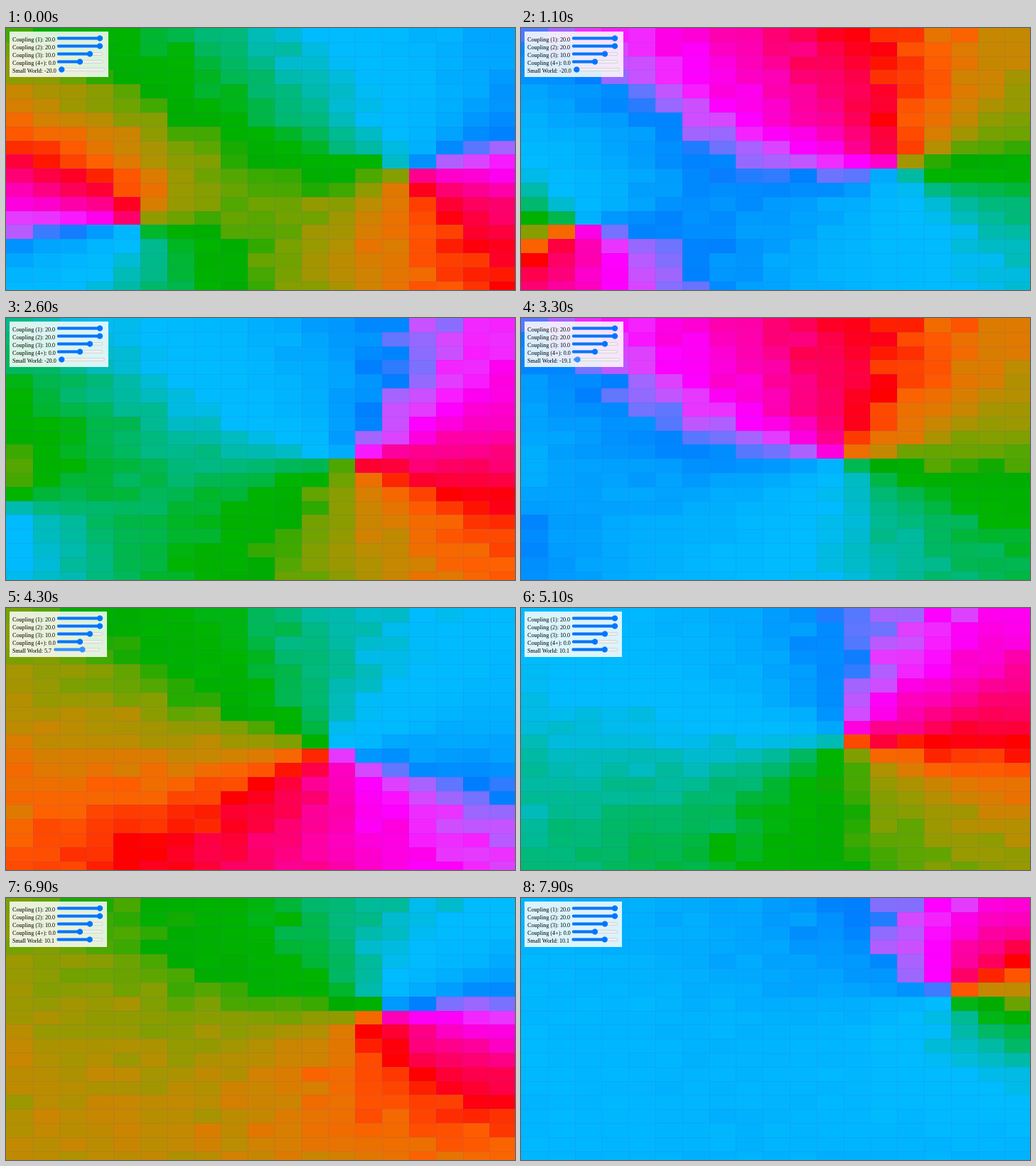
A matplotlib script that plays this animation: 716x369 px, repeating every 8000 ms.

```python
import numpy as np
import matplotlib.pyplot as plt
from matplotlib.animation import FuncAnimation
from matplotlib.collections import LineCollection
from matplotlib.patches import Circle, FancyBboxPatch, Rectangle

W, H, DPI = 716, 369, 100
FRAMES, STEP = 80, 100
N, CW, CH = 19, 37.8, 19.82     # cells per side, cell size
SPIN = 0.151                    # common rotation, degrees per ms
BLUE, LIGHT = "#0075ff", "#3793ff"

gx, gy = np.meshgrid(np.arange(N), np.arange(N))
u, v = gx / 9 - 1, gy / 9 - 1
jitter = np.random.default_rng(4).normal(0, 4, (N, N))


def lch(hue, light=61, chroma=120):
    """CIE LCh (hue in degrees) to clipped sRGB."""
    h = np.radians(hue)
    fy = (light + 16) / 116
    f = np.stack([fy + chroma * np.cos(h) / 500,
                  np.full_like(h, fy),
                  fy - chroma * np.sin(h) / 200], -1)
    xyz = np.where(f > 6 / 29, f ** 3, (f - 4 / 29) * 0.12842)
    xyz = xyz * (0.9505, 1, 1.089)
    m = np.array([[3.2406, -1.5372, -0.4986],
                  [-0.9689, 1.8758, 0.0415],
                  [0.0557, -0.2040, 1.0570]])
    rgb = np.clip(xyz @ m.T, 0, 1)
    return np.where(rgb > 0.0031308,
                    1.055 * np.maximum(rgb, 0.003) ** (1 / 2.4) - 0.055,
                    12.92 * rgb)


def vortex(x, y):
    """Phase winding once, clockwise on screen, around cell (x, y)."""
    return np.degrees(np.arctan2(gy - y, gx - x))


def hue_field(t):
    # The main vortex drifts left, then up to the right corner.
    main = vortex(np.interp(t, (0, 3300, 5900, 7900), (14.5, 11.5, 11.5, 15.5)),
                  np.interp(t, (4300, 7900), (9.5, 6.3)))
    # A second one leaves through the left edge.
    side = vortex(np.interp(t, (0, 1100, 2000, 3300, 4300),
                            (4.3, 1.5, 1.5, -4, -14)),
                  np.interp(t, (1100, 2000), (13.5, 12.5)))
    # The phase slope turns over while the coupling takes hold.
    late = np.interp(t, (4300, 7900), (0, 1))
    tilt = ((4 + 15 * late) * u + 25 * late * u * v
            + np.interp(t, (3300, 7900), (-34, 19)) * v)
    return SPIN * t - 14 + main + side + tilt + jitter


fig = plt.figure(figsize=(W / DPI, H / DPI), dpi=DPI)
ax = fig.add_axes([0, 0, 1, 1])
ax.axis("off")
cells = ax.imshow(np.zeros((N, N, 3)), extent=(0, N * CW, N * CH, 0),
                  interpolation="nearest", aspect="auto")
ax.set(xlim=(0, W), ylim=(H, 0))

seams = [[(i * CW, 0), (i * CW, H)] for i in range(1, N)]
seams += [[(0, i * CH), (W, i * CH)] for i in range(1, N)]
ax.add_collection(LineCollection(seams, colors=[(0.35, 0.3, 0.9)],
                                 linewidths=0.72, alpha=0.13))

panel = ax.add_patch(Rectangle((5, 5), 139, 64, fc="white", ec="none",
                               alpha=0.86, zorder=3))


class Slider:
    """Labelled range input running from -20 to 20."""
    LENGTH, THICK = 64, 4

    def __init__(self, row, name):
        self.name = name
        self.y = 14.5 + 11 * row
        self.label = ax.text(9, self.y + 4.2, "", family="Liberation Serif",
                             size=8.1 * 72 / DPI, color="black", zorder=5)
        self.track = self.bar(4, fc="#efefef", ec="#c4c4c4", lw=0.4)
        self.fill = self.bar(5, fc=BLUE, ec="none")
        self.knob = ax.add_patch(Circle((0, self.y), 4.1, ec="none", zorder=6))

    def bar(self, z, **style):
        box = FancyBboxPatch((0, self.y - self.THICK / 2), 1, self.THICK,
                             boxstyle="round,pad=0,rounding_size=1.7",
                             zorder=z, **style)
        return ax.add_patch(box)

    def set(self, value, x, active=False):
        color = LIGHT if active else BLUE
        knob = x + self.LENGTH / 2 + 28 * value / 20
        self.label.set_text(f"{self.name}: {value:.1f}")
        for bar, end in ((self.track, x + self.LENGTH), (self.fill, knob)):
            bar.set_x(x)
            bar.set_width(end - x)
        self.fill.set_facecolor(color)
        self.knob.center = knob, self.y
        self.knob.set_facecolor(color)


levels = {"Coupling (1)": 20, "Coupling (2)": 20,
          "Coupling (3)": 10, "Coupling (4+)": 0}
for row, (name, level) in enumerate(levels.items()):
    Slider(row, name).set(level, 72)
world = Slider(len(levels), "Small World")


def draw(i):
    t = i * STEP
    cells.set_data(lch(hue_field(t)))
    value = round(float(np.interp(t, (3200, 3300, 4300, 4600),
                                  (-20, -19.1, 5.7, 10.1))), 1)
    # The input sits after its label, so each extra character moves it.
    x = 67.5 + 4.1 * (abs(value) >= 10) + 2.7 * (value < 0)
    world.set(value, x, 3200 < t < 4700)
    panel.set_width(max(x, 72.3) + Slider.LENGTH + 0.7)
    return []


anim = FuncAnimation(fig, draw, frames=FRAMES, interval=STEP,
                     repeat=True, repeat_delay=0, blit=False)
plt.show()
```
